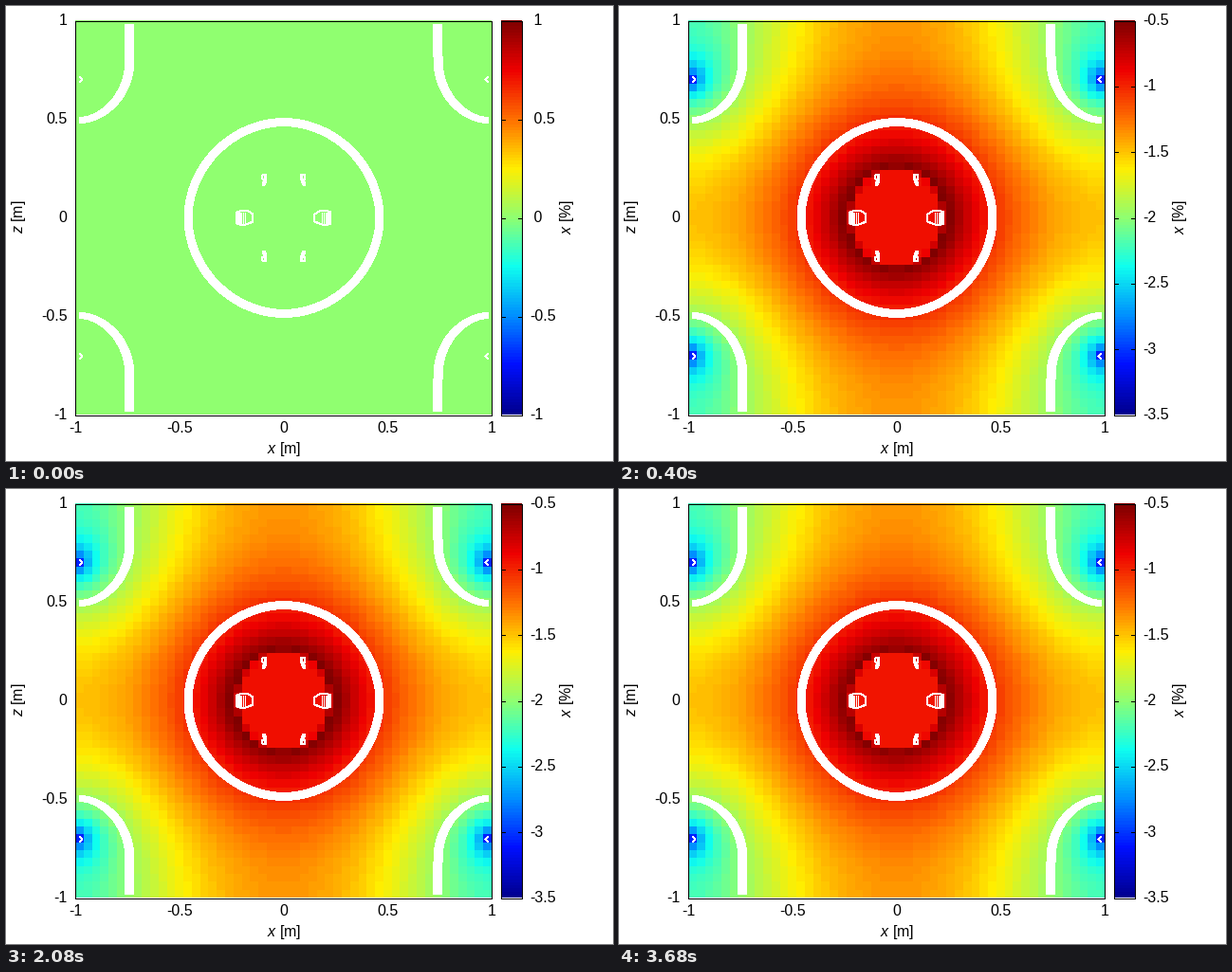
Write a matplotlib script that moves like this. It is 640 px wide and 480 px high and loops after 4 s.

```python
import matplotlib.pyplot as plt
import numpy as np
from matplotlib.animation import FuncAnimation
from matplotlib.colors import LinearSegmentedColormap
from matplotlib.patches import Rectangle

plt.rcParams.update({
    "font.family": "Liberation Sans",
    "mathtext.fontset": "custom",
    "mathtext.rm": "Liberation Sans",
    "mathtext.it": "Liberation Sans:italic",
})

DPI = 100
PX = 72 / DPI
LEFT, RIGHT, TOP, BOTTOM = 73, 512, 15, 431
HALF_W, HALF_H = (RIGHT - LEFT) / 2, (BOTTOM - TOP) / 2
BAR_LEFT, BAR_RIGHT = 522, 544
CELLS = 50
LEVELS = 129
JET = LinearSegmentedColormap.from_list("jet_soft", [
    "#000090", "#000fff", "#0090ff", "#0fffee", "#90ff70",
    "#ffee00", "#ff7000", "#ee0000", "#7f0000"], N=LEVELS)

fig = plt.figure(figsize=(6.4, 4.8), dpi=DPI, facecolor="white")
ax = fig.add_axes([0, 0, 1, 1])
ax.axis("off")


def to_px(x, z):
    return LEFT + (x + 1) * HALF_W, TOP + (1 - z) * HALF_H


centres = -1 + (np.arange(CELLS) + 0.5) * 2 / CELLS
X, Z = np.meshgrid(centres, centres[::-1])


def log_source(x0, z0):
    """Logarithmic potential of a source repeated with period 2 both ways."""
    return sum(0.5 * np.log(2 * (np.cosh(np.pi * (Z - z0 + 2 * n))
                                 - np.cos(np.pi * (X - x0))))
               for n in (-2, -1, 0, 1, 2))


def make_field(drop):
    wells = log_source(1, 0.7) + log_source(1, -0.7) - 2 * log_source(0, 0)
    outside = -1.723 + 0.42 * wells
    core = np.clip((0.26 - np.hypot(1.08 * X, 0.98 * Z)) / 0.03, 0, 1)
    field = core * -0.93 + (1 - core) * outside
    return field - drop * np.exp(-(np.hypot(X, Z) / 0.4) ** 2)


def label(x, y, text, ha="center", **kw):
    return ax.text(x, y, text, fontsize=16 * PX, ha=ha,
                   **{"va": "baseline", **kw})


def line(xs, ys, color="white", **kw):
    return ax.plot(xs, ys, color=color, lw=PX, antialiased=False,
                   solid_capstyle="butt", **kw)[0]


def mirrored(xs, ys, flip_z=False):
    """Draw a path and its reflections about the plot centre."""
    xs, ys = np.array(xs), np.array(ys)
    for px in (xs, LEFT + RIGHT - xs):
        line(px, ys, zorder=3)
        if flip_z:
            line(px, TOP + BOTTOM - ys, zorder=3)


def image(data, x0, x1):
    return ax.imshow(data, cmap=JET, interpolation="nearest", aspect="auto",
                     extent=(x0 - 0.5, x1 - 0.5, BOTTOM - 0.5, TOP - 0.5))


def frame_box(x0, x1):
    ax.add_patch(Rectangle((x0, TOP), x1 - x0, BOTTOM - TOP, fill=False,
                           ec="black", lw=PX, antialiased=False, zorder=5))


def outline(values, levels):
    ax.contour(*to_px(X, Z), values, levels=levels, colors="white",
               linewidths=PX, antialiased=False, zorder=3)


# Heat map and colour bar
heat = image(np.zeros((CELLS, CELLS)), LEFT, RIGHT)
image(np.linspace(1, 0, LEVELS)[:, None], BAR_LEFT, BAR_RIGHT)
frame_box(LEFT, RIGHT)
frame_box(BAR_LEFT, BAR_RIGHT)

# White contours: slightly pointed ring and rounded corner walls
POWER = 1.95
ring = (abs(HALF_W * X) ** POWER + abs(HALF_H * Z) ** POWER) ** (1 / POWER)
outline(ring, [97.5, 99.5, 101.5, 102.5, 103.5, 104.5])
for k in range(-2, 3):
    wide, tall = 57 + 2 * k, 64 + 1.2 * k
    outline(np.hypot(HALF_W * (1 - abs(X)) / wide,
                     HALF_H * np.minimum(abs(Z) - 0.8, 0) / tall), [1])

mirrored([77, 80, 77], [74, 77, 80], flip_z=True)
mirrored([270, 274, 274, 272, 270, 272, 270, 270],
         [178, 177, 183, 188, 188, 182, 182, 178], flip_z=True)
mirrored([273, 273, 271], [178, 182, 188], flip_z=True)
mirrored([243, 249, 255, 260, 260, 255, 249, 243, 243],
         [217, 215, 216, 219, 227, 229, 231, 229, 217])
for x in (244, 245, 246, 247, 248, 250, 252):
    mirrored([x, x], [217, 229])

# Axis labels
for value in (-1, -0.5, 0, 0.5, 1):
    px, py = to_px(value, value)
    label(px, 449.6, f"{value:g}")
    label(64, py + 4.5, f"{value:g}", ha="right")
label(293, 471, "$x$ [m]")
label(13, 221.5, "$z$ [m]", va="center", rotation=90)
label(591, 222, "$x$ [%]", va="center", rotation=90)


def scale_marks(values):
    marks = []
    for value, y in zip(values, np.linspace(BOTTOM, TOP, len(values))):
        text = f"{value:g}" if value < 0 else f" {value:g}"
        marks.append(label(552, y + 4.5, text, ha="left"))
        for xs in ((BAR_LEFT, BAR_LEFT + 4), (BAR_RIGHT - 4, BAR_RIGHT)):
            marks.append(line(xs, (y, y), "black", zorder=5))
    return marks


# Each state: field, colour limits, colour bar marks
rest_marks = scale_marks(np.linspace(-1, 1, 5))
active_marks = scale_marks(np.linspace(-3.5, -0.5, 7))
STATES = [
    (np.zeros((CELLS, CELLS)), (-1, 1), rest_marks),
    (make_field(0), (-3.5, -0.5), active_marks),
    (make_field(0.03), (-3.5, -0.5), active_marks),
]

# Whole numbers are pixel centres; the nudge keeps line snapping in that pixel
ax.set_xlim(-0.49, 639.51)
ax.set_ylim(479.49, -0.51)


def update(i):
    field, limits, shown = STATES[0 if i < 1 else 1 if i < 8 else 2]
    heat.set_data(field)
    heat.set_clim(*limits)
    for marks in (rest_marks, active_marks):
        for mark in marks:
            mark.set_visible(marks is shown)
    return [heat]


anim = FuncAnimation(fig, update, frames=10, interval=400, repeat=True,
                     repeat_delay=0, blit=False)
plt.show()
```
